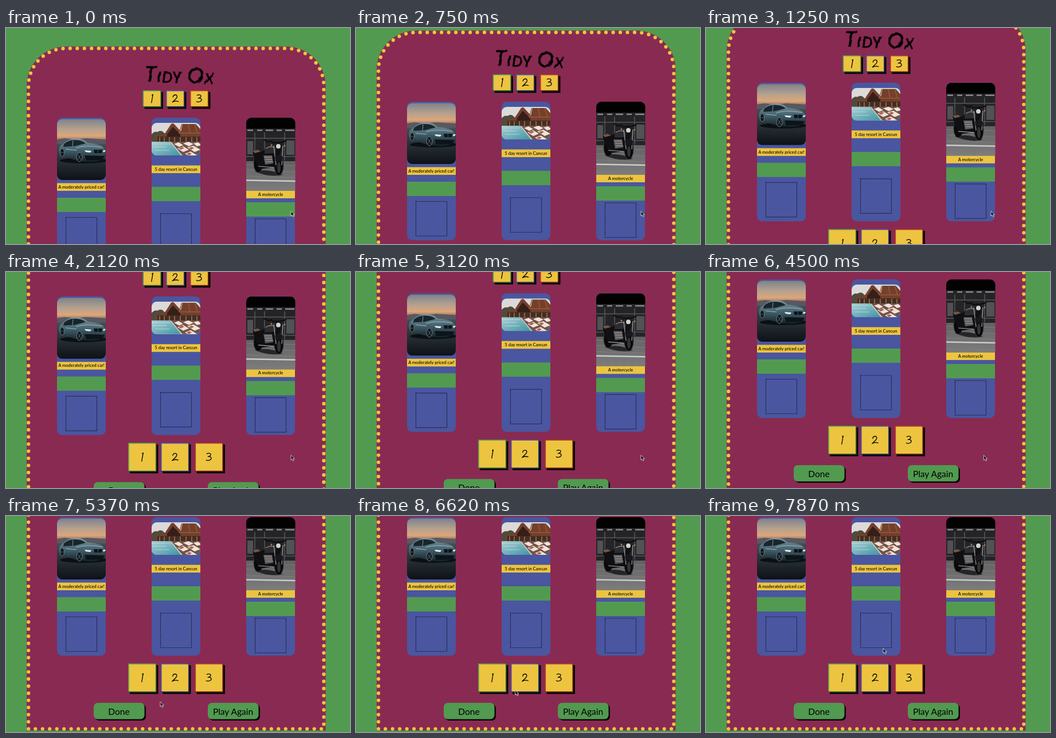
An HTML page for the animation above (8000 ms loop, 600 px wide and 378 px high).

```html
<!DOCTYPE html>
<html lang="en">
<head>
<meta charset="utf-8">
<title>Prize game</title>
<style>
  html, body { margin: 0; width: 100%; height: 100%; overflow: hidden; background: #529a50; }
  svg { display: block; width: 100vw; height: 100vh; }
  text { font-family: Lato, "Open Sans", sans-serif; text-anchor: middle; fill: #000; }
  .label { font-size: 7.5px; font-weight: 500; }
  .button { font-size: 15.5px; }
  .heading { font-size: 37px; font-style: italic; font-variant: small-caps; stroke: #000; stroke-width: .9; }
</style>
</head>
<body>
<svg viewBox="0 0 600 378" xmlns="http://www.w3.org/2000/svg">
  <defs>
    <linearGradient id="dusk" x2="0" y2="1">
      <stop offset="0" stop-color="#7d8288"/><stop offset=".16" stop-color="#b2a090"/>
      <stop offset=".28" stop-color="#dda67a"/><stop offset=".33" stop-color="#a67f69"/>
      <stop offset=".37" stop-color="#4b5056"/><stop offset=".65" stop-color="#293138"/>
      <stop offset="1" stop-color="#0d1115"/>
    </linearGradient>
    <linearGradient id="paint" x2="0" y2="1">
      <stop offset="0" stop-color="#7d98a2"/><stop offset=".5" stop-color="#42606b"/>
      <stop offset="1" stop-color="#15222a"/>
    </linearGradient>
    <linearGradient id="pool" x2="1" y2="1">
      <stop offset="0" stop-color="#a9d0d4"/><stop offset="1" stop-color="#3d93a2"/>
    </linearGradient>
    <linearGradient id="yard" x2="0" y2="1">
      <stop offset="0" stop-color="#3c3c3e"/><stop offset=".6" stop-color="#626263"/>
      <stop offset="1" stop-color="#7d7d7e"/>
    </linearGradient>
    <clipPath id="clipCar"><rect x="89" y="159.5" width="85" height="106.5" rx="9"/></clipPath>
    <clipPath id="clipResort"><rect x="254" y="166" width="85" height="57" rx="9"/></clipPath>
    <clipPath id="clipBike"><path d="M419 285V166a9 9 0 0 1 9-9h67.500a9 9 0 0 1 9 9V285z"/></clipPath>
    <filter id="rough" x="-10%" y="-20%" width="120%" height="140%">
      <feTurbulence type="turbulence" baseFrequency=".07" numOctaves="1" seed="4"/>
      <feDisplacementMap in="SourceGraphic" scale="4"/>
    </filter>
  </defs>

  <g id="page">
    <path d="M36 530.500V101a68.500 68.500 0 0 1 68.500-68.500H489a68.500 68.500 0 0 1 68.500 68.500V530.500z" fill="#892a52"/>
    <path d="M39.200 527.500V101a65.300 65.300 0 0 1 65.300-65.300H489a65.300 65.300 0 0 1 65.300 65.300V527.500z"
      fill="none" stroke="#efc53f" stroke-width="6.200" stroke-linecap="round" stroke-dasharray="0 12.470"/>
    <text class="heading" x="301" y="94" letter-spacing="1.500" transform="rotate(2 300 90)" filter="url(#rough)">Tidy Ox</text>
    <g id="tiles"></g>
    <g id="cards"></g>

    <g clip-path="url(#clipCar)">
      <rect x="89" y="159" width="85" height="108" fill="url(#dusk)"/>
      <path d="M89 195l13-2 18 2 20-2 34 2v8H89z" fill="#575960"/>
      <ellipse cx="135" cy="232" rx="41" ry="5" fill="#0b1014"/>
      <path d="M92 215q0-9 7-12 9-8 18-9 17-2 25 7 12 1 22 4 8 3 9 10l-1 13q-11 7-29 6-22-1-37-8l-10-4q-4-2-4-7z" fill="url(#paint)"/>
      <path d="M101 203q8-7 17-7 14-1 21 6l-20 5-19 1z" fill="#18252d"/>
      <path d="M117 197l-1 10" stroke="#6e8791" stroke-width="1.200"/>
      <path d="M122 210q16-6 46-1M104 212l19 2" fill="none" stroke="#a2b8bf" stroke-width="1"/>
      <path d="M153 213h7v6h-6zm8 0h7l-1 6h-6zM137 223l35 1-4 7-28 1z" fill="#0d1419"/>
      <path d="M137 214l12 1-2 3-8-1zm33 0h4l-2 3h-3z" fill="#e4efef"/>
      <g fill="#10181d" stroke="#75858e" stroke-width=".900">
        <ellipse cx="128" cy="226" rx="5" ry="8"/><ellipse cx="98" cy="218" rx="3.500" ry="7"/>
      </g>
      <path d="M125 221l6 10m0-10l-6 10M95.500 218h5" stroke="#66757d" stroke-width=".800"/>
    </g>

    <g clip-path="url(#clipResort)">
      <rect x="254" y="166" width="85" height="57" fill="#dcdad9"/>
      <path d="M254 186q5-6 10-4 7-5 12 2l8 3v13h-30z" fill="#504b3d"/>
      <path d="M262 190l15-5 11-17q4-3 7 2l10 11 3-13h23l8 9v22h-77z" fill="#74402b"/>
      <path d="M281 186l10-13 13 13v10h-23z" fill="#351f19"/>
      <path d="M307 168l-5 16h37M318 168l3 16m8-16l5 16" fill="none" stroke="#95593c" stroke-width="1.500"/>
      <path d="M264 190h75v11h-75z" fill="#452d23"/>
      <path d="M268 191v9m8-9v9m9-9v9m9-9v9m10-9v9m10-9v9m10-9v9m9-9v9" stroke="#b98961" stroke-width="1.200"/>
      <path d="M254 199h35l18 24h-53z" fill="url(#pool)"/>
      <path d="M287 199h52v24h-31z" fill="#745246"/>
      <path d="M293 203l8-3 8 5-7 3zm16-1l9-3 9 4-8 4zm18 0l8-2 6 5-8 2zM299 211l10-4 10 6-10 4zm17-2l11-3 12 7-10 4zM312 220l10-4 12 7-11 3z" fill="#eee4db"/>
      <path d="M301 211l6-3 4 2-6 3zm18-1l5-2 4 2-5 3zm-4 10l5-2 4 2-5 3z" fill="#b05d51"/>
      <path d="M288 200l18 23" stroke="#d8d4c8" stroke-width="1.300"/>
      <path d="M254 203h33m-31 5h24m-20 6h25" stroke="#d9eceb" opacity=".6"/>
    </g>

    <g clip-path="url(#clipBike)">
      <rect x="419" y="157" width="86" height="128" fill="url(#yard)"/>
      <rect x="419" y="157" width="86" height="19" fill="#020203"/>
      <rect x="419" y="176" width="86" height="57" fill="#242426"/>
      <path d="M421 179h10m7 0h9m6 0h13m6 0h9m6 0h16" stroke="#89898c" stroke-width="2.500"/>
      <path d="M434 183v49m17-49v49m35-49v49M419 193h86M419 225h86" stroke="#555658" stroke-width="1.500"/>
      <path d="M421 198h10v23h-10zm68-1h14v25h-14z" fill="#515254"/>
      <path d="M419 239l86 2M419 248l86 4M419 259l86 3" stroke="#828283" stroke-width=".800"/>
      <path d="M419 266.500l86 1.500" stroke="#cbcbcc" stroke-width="2.500"/>
      <path d="M434 251q25-6 49 6-24 5-49-6z" fill="#252527"/>
      <g fill="#09090b" stroke="#3a3a3d">
        <ellipse cx="440" cy="237" rx="8" ry="16"/><ellipse cx="476" cy="240" rx="8" ry="18"/>
      </g>
      <path d="M430 215q9-4 17 1l8-7 19-2 6 6-8 30-29 4-9-15z" fill="#101012"/>
      <path d="M451 211q9-9 21-2l-2 10-19 1z" fill="#2d2d30"/>
      <path d="M453 211q7-5 15-2" fill="none" stroke="#a8a8aa"/>
      <path d="M449 195l8 4 8-1m24-1l-8 3-17 1" fill="none" stroke="#0e0e10" stroke-width="2.500"/>
      <path d="M467 206l4 34m12-34l-2 34M440 242l27 2" stroke="#a7a7a8" stroke-width="1.200"/>
      <path d="M449 223h15l2 14-14 2z" fill="#5d5d60"/>
      <path d="M451 226h13m-12 4h13m-12 4h13" stroke="#b0b0b1" stroke-width=".800"/>
      <path d="M430 215l9-2 6 3-11 3z" fill="#70564a"/>
      <circle cx="475" cy="207" r="4.800" fill="#d2d2d2" stroke="#141416" stroke-width="1.700"/>
      <circle cx="463" cy="205" r="1.500" fill="#bd7743"/><circle cx="486" cy="206" r="1.500" fill="#bd7743"/>
      <path d="M469 225q7-5 14 0l-1 8h-12z" fill="#19191b"/>
      <ellipse cx="476" cy="244" rx="3" ry="10" fill="#343437"/>
    </g>
  </g>
  <path id="cursor" d="M0 0v8.500l2-1.800 1.500 3.300 1.600-.700-1.500-3.200H6.300z" fill="#111" stroke="#fff" stroke-width=".700"/>
</svg>
<script>
const LOOP = 8000, STEP = 125;
const YELLOW = "#ecc440", GREEN = "#529a50", BLUE = "#4a56a0", RED = "#b8382a";
const $ = id => document.getElementById(id);

const rect = (x, y, w, h, fill, extra = "") =>
  `<rect x="${x}" y="${y}" width="${w}" height="${h}" fill="${fill}" ${extra}/>`;

const digits = [
  "M0-6L1.500-7.500L-1 7",
  "M-4-3C-3-8 4-8 3-3C2 0-3 4-5 6Q0 3 5.500 5",
  "M-4-6C0-8 6-6 1-2L-2-1C4-2 6 3 1 5Q-2 6.500-5 5"
];
const tints = [GREEN, BLUE, RED];

function tile(x, y, w, h, n) {
  const edge = `M${x + w - 0.7} ${y}V${y + h - 0.7}H${x}`;
  return rect(x + 3, y + 3, w, h, "#080808")
    + rect(x + 0.8, y + 0.8, w - 1.6, h - 1.6, YELLOW, `stroke="${tints[n]}" stroke-width="1.6"`)
    + `<path d="${edge}" fill="none" stroke="#000" stroke-opacity=".4" stroke-width="1.4"/>`
    + `<path d="${digits[n]}" aria-label="${n + 1}" transform="translate(${x + w / 2} ${y + h / 2})"
        fill="none" stroke="#000" stroke-width="1.300" stroke-linecap="round" stroke-linejoin="round"/>`;
}

function button(x, label) {
  return rect(x + 2.5, 484.5, 88.5, 28.5, "#080808", 'rx="7"')
    + rect(x, 482, 88.5, 28.5, GREEN, 'rx="7"')
    + `<text class="button" x="${x + 44}" y="502.5">${label}</text>`;
}

function card(x, labelY, bandY, slotY, label) {
  return rect(x, 157, 85, 242.5, BLUE, 'rx="9"')
    + rect(x, labelY, 85, 13.5, YELLOW)
    + `<text class="label" x="${x + 42.5}" y="${labelY + 9.2}">${label}</text>`
    + rect(x, bandY, 85, 25, GREEN)
    + rect(x + 15.5, slotY, 54, 60.5, "none", 'stroke="#0b0b14" stroke-width="1.2" stroke-dasharray="1.2 1.2"');
}

$("tiles").innerHTML =
  [238.5, 279, 321].map((x, n) => tile(x, 109, 32.5, 29.5, n)).join("")
  + [213, 270, 329.5].map((x, n) => tile(x, 413, 49.5, 50.5, n)).join("")
  + button(153, "Done") + button(352, "Play Again");

$("cards").innerHTML =
  card(89, 271.5, 297, 331.5, "A moderately priced car!")
  + card(254, 240.5, 278, 325, "5 day resort in Cancun")
  + card(419, 284.5, 305, 334, "A motorcycle");

// Each key is [time, ...values].
const scrollKeys = [[0, 0], [750, 28], [1000, 33], [1625, 113], [2125, 114.2],
  [3125, 119.7], [3875, 142], [4500, 144], [5250, 155]];
const cursorKeys = [[4375, 497, 320.5], [5250, 269, 325], [6250, 269, 325], [7500, 309, 231.5]];

function sample(keys, t) {
  const next = keys.findIndex(k => k[0] > t);
  if (next < 0) return keys[keys.length - 1].slice(1);
  if (next === 0) return keys[0].slice(1);
  const a = keys[next - 1], b = keys[next];
  const u = (t - a[0]) / (b[0] - a[0]), eased = u * u * (3 - 2 * u);
  return a.slice(1).map((v, i) => v + (b[i + 1] - v) * eased);
}

function draw(ms) {
  const t = Math.floor((ms % LOOP + 5) / STEP) * STEP % LOOP;
  $("page").setAttribute("transform", `translate(0 ${-sample(scrollKeys, t)[0]})`);
  $("cursor").setAttribute("transform", `translate(${sample(cursorKeys, t)})`);
}

const start = performance.now();
function tick() {
  draw(performance.now() - start);
  requestAnimationFrame(tick);
}
tick();
</script>
</body>
</html>
```
